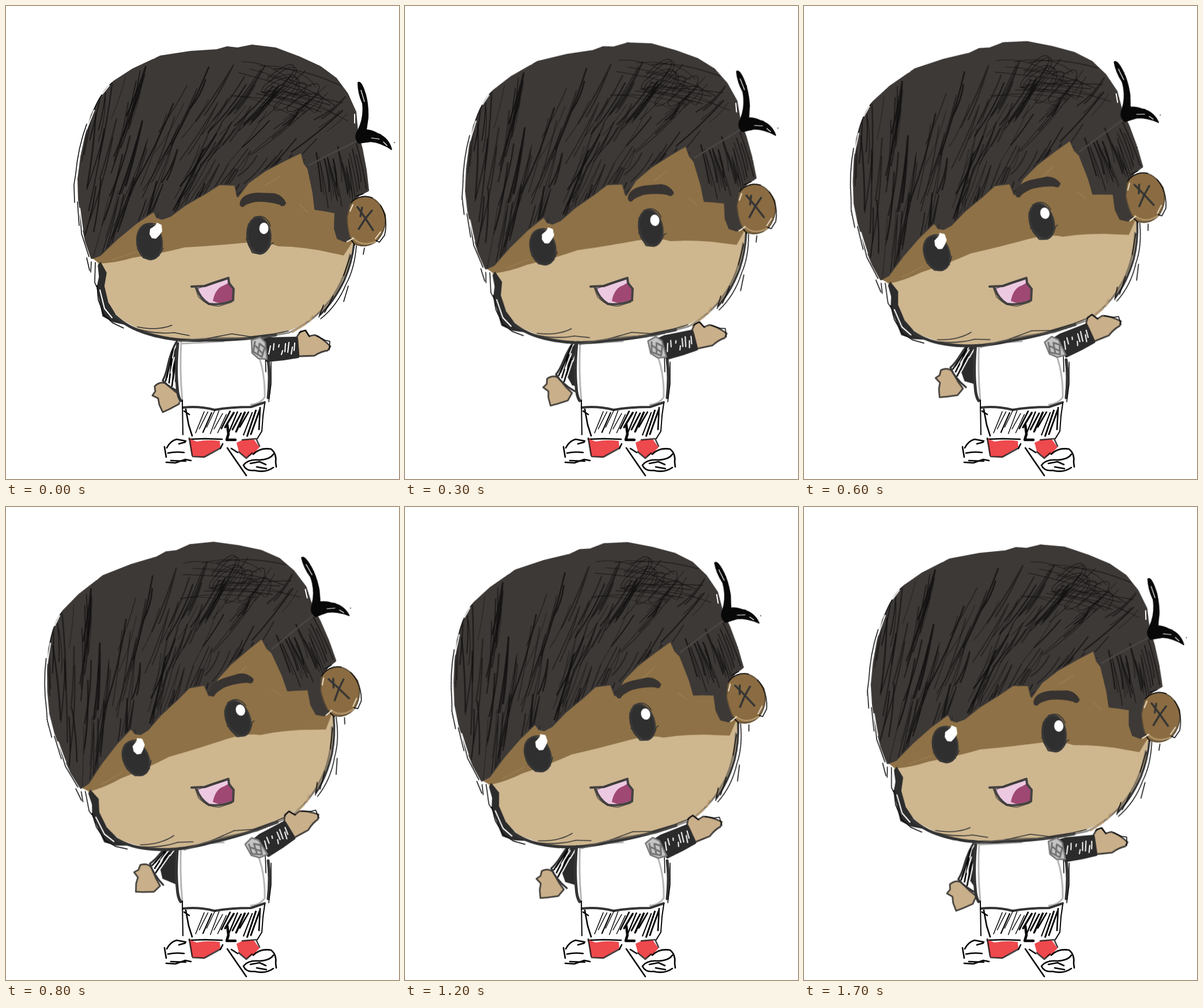
Recreate the animation shown at these times as an HTML page. Size 682 by 821 pixels, loop 1800 ms.

```html
<!DOCTYPE html>
<html lang="en">
<head>
<meta charset="utf-8">
<title>Waving boy</title>
<style>
html, body { margin: 0; width: 100%; height: 100%; overflow: hidden; background: #fff; }
svg { display: block; width: 682px; height: 821px; }
path, ellipse { stroke-linecap: round; stroke-linejoin: round; }
.ink { fill: none; stroke: #343434; stroke-width: 3.4; }
.black { fill: none; stroke: #050505; stroke-width: 2.6; }
.thin { stroke-width: 1.5; }
.thick { stroke-width: 5; }
.soft { fill: none; stroke: #77777788; stroke-width: 3; }
.skin { fill: #c9af8a; stroke: #45413c; stroke-width: 2.8; }
.sleeve { fill: #2b2b2b; stroke: #2b2b2b; stroke-width: 4; }
.gap { fill: none; stroke: #fff; stroke-width: 2; }
.pupil { fill: #2f2f30; stroke: #3a3938; stroke-width: 3; }
.red { fill: #ee494d; }
#head { transform-origin: 362px 547px; }
#eyes { transform-origin: 323px 496px; }
#armL { transform-origin: 327px 588px; }
#armR { transform-origin: 432px 606px; }
</style>
</head>
<body>
<svg viewBox="0 0 682 821">
  <defs>
    <path id="hairShape" d="M149 437L139 408L132 375L127 335L126 300L131 262L139 225L149 190L164 160L187 132L221 110L268 88L320 80L366 77L384 72L402 74L427 69L468 74L508 89L545 106L572 126L592 153L606 184L609 218L617 248L624 285L628 320L612 328L598 342L592 372L596 404L588 408L576 403L571 386L572 358L551 354L537 352L534 325L525 282L518 272L513 253L482 268L448 286L420 306L402 330L398 310L370 309L345 325L312 344L285 364L270 369L262 366L257 355L226 376L192 404L163 432Z"/>
    <clipPath id="hairClip"><use href="#hairShape"/></clipPath>
  </defs>

  <g id="armL">
    <path class="skin" d="M277 655Q267 651 258 660L259 669L254 676L264 681L266 692L272 705L283 700L300 691L305 677L292 668Z"/>
    <path d="M330 580L297 580L288 594L279 628L272 650L284 662L308 673L332 664Z" fill="#fff"/>
    <path d="M299 583L292 598L288 625L290 648L303 664L332 662L332 583Z" fill="#2b2b2b"/>
    <path class="ink" d="M297 581Q286 598 280 627Q277 641 272 650Q284 664 309 673"/>
    <path class="black" d="M290 596L279 645M288 612L283 654M293 619L288 660M282 631L277 651"/>
    <path class="gap" d="M292 610L286 637M296 622L292 650M300 605L297 622"/>
  </g>

  <g id="body">
    <path d="M298 578L452 578L454 690L400 700L306 696L298 682Z" fill="#fff"/>
    <path class="soft" d="M304 583Q301 630 306 686M304 586L345 584L378 582M426 582Q450 620 449 679Q442 690 425 692"/>
    <path class="ink thick" d="M298 586Q294 630 297 660Q298 678 303 685"/>
    <path class="ink thick" d="M455 614Q459 644 455 680"/>
    <path class="black thin" d="M460 618L460 656L456 687M450 604L451 635"/>
    <path class="ink" d="M307 697Q335 694 362 701Q390 696 425 696L449 688" style="stroke-width:4"/>
    <path class="black" d="M306 684L307 744M449 690L446 711L444 738L436 751" style="stroke-width:2"/>
    <path class="black" d="M312 700L317 727L323 746M441 697L439 735M309 703L318 709M318 752L345 751L375 752"/>
    <path class="black" d="M384 727L386 743L383 753L398 753" style="stroke-width:4.5"/>
    <g id="hatch" class="black"></g>
    <path class="red" d="M318 751L331 756Q350 752 371 755L372 766L356 775L343 783L323 781Z"/>
    <path class="red" d="M400 758L411 753L430 752L440 766L429 777L417 784L404 773Z"/>
    <path class="black" d="M324 782L344 783L371 768M318 750L323 780M410 753L434 751L440 764M404 774L417 785L427 776" stroke-opacity=".75"/>
    <path class="black" d="M279 767Q285 755 296 752L312 755M275 765L278 783M281 776Q294 773 309 775M278 792L294 793L311 787L321 789M286 789L312 790M300 760L311 757"/>
    <path class="black" d="M384 767L397 786L417 815M376 760L372 768M391 768L402 775"/>
    <path class="black" d="M429 778Q441 766 460 769Q470 777 468 792L469 800M412 797Q420 786 440 788Q458 787 464 778M412 797Q417 808 431 806Q450 811 464 801M424 794L440 791L451 796M435 800L452 803"/>
  </g>

  <g id="head">
    <path d="M160 380L157 443L167 460L171 490L180 522L198 543L225 558Q262 575 305 580Q370 581 430 575L480 568L518 553L550 529L576 497L594 455L604 410L596 330L520 220L300 300Z" fill="#ceb68f"/>
    <path d="M150 438L162 447Q190 446 220 437Q268 430 310 419Q362 416 414 411Q452 408 472 417Q520 418 562 428L586 433L603 407L590 300L520 200L300 290Z" fill="#8e7146"/>
    <path class="soft" d="M185 440L225 427M510 345L523 358M451 311L476 295" style="stroke:#9a7d50;stroke-width:1.5"/>

    <path d="M164 445L174 463L170 486L177 515L190 536L208 553L186 548L168 538L163 513L158 489L162 470L160 450Z" fill="#2c2c2c" stroke="#2c2c2c" stroke-width="1.5"/>
    <path class="gap" d="M163 493L171 525L184 541"/>
    <path class="black thin" d="M155 445L154 480L157 487M140 437L145 459M148 444L147 462M158 485L160 510L170 536L185 550L204 559"/>
    <path class="ink" d="M187 536Q211 559 247 569Q292 583 345 580Q405 581 468 571" style="stroke-width:5"/>
    <path class="ink thin" d="M203 551Q246 571 292 567L318 572M228 557Q264 564 288 554M350 577L392 569L424 574L465 569L490 564"/>
    <path class="soft" d="M300 582Q365 573 430 578L491 567Q533 548 556 518Q585 485 597 431" style="stroke:#55524daa"/>
    <path class="ink" d="M604 414Q600 446 587 476Q569 513 545 536"/>
    <path class="black thin" d="M608 416Q605 456 590 483Q575 520 546 543M598 433L586 468M594 486L586 513M622 420L620 431M551 519L543 540M568 503L553 532"/>
    <path class="soft" d="M497 566L520 552M526 548L532 538" style="stroke:#b79b72"/>

    <use href="#hairShape" fill="#3d3937" stroke="#3d3937" stroke-width="4" stroke-linejoin="round"/>
    <g clip-path="url(#hairClip)">
      <g id="strands" fill="none" stroke="#0f0e0e"></g>
      <path class="soft" d="M526 276L565 256L612 233" style="stroke:#4a4644"/>
    </g>
    <path class="black thin" d="M140 205Q125 246 121 291L118 310L119 341M184 133Q165 150 152 181M129 364L131 395L144 435M124 340L127 381"/>
    <path class="gap" d="M153 181L140 214M128 351L133 389M179 138L167 153M249 92L258 90M605 188L605 203"/>

    <path d="M611 133Q615 130 621 145Q629 166 628 194L625 215Q636 216 646 222Q664 230 669 249Q652 237 633 235L612 238Q603 228 611 216Q622 194 619 169Q611 151 611 133Z" fill="#080808" stroke="#080808" stroke-width="2"/>
    <path d="M616 146L622 166M634 229L648 231M655 236L661 242" class="gap" style="stroke-width:1.2"/>
    <path class="black thin" d="M627 218L650 223M674 237L674.5 237"/>

    <g transform="translate(1 4)">
      <path d="M596 343Q601 327 626 327Q646 330 657 358Q660 386 641 405Q622 418 603 408Q592 398 591 362Z" fill="#8b6c42" stroke="#5b4c36" stroke-width="2"/>
      <path d="M601 398Q615 415 640 405" fill="none" stroke="#b4996d" stroke-width="2.5"/>
      <path class="black thin" d="M598 337Q615 321 635 329M649 342Q663 365 656 394L647 406L641 403M597 400L604 411M607 326L619 322"/>
      <path class="ink" d="M609 345L621 362L636 385M634 351L622 366L611 383M617 346L614 361"/>
      <path d="M601 341L596 352M649 388L640 400M602 399L591 405" fill="none" stroke="#e8dcc7" stroke-width="2"/>
    </g>
  </g>

  <g id="eyes">
    <path d="M408 338Q414 326 437 325L466 326Q480 330 485 342Q481 350 475 344Q453 338 433 339Q417 342 411 348Q404 347 408 338Z" fill="#373331" stroke="#373331" stroke-width="2"/>
    <ellipse class="pupil" cx="249" cy="409" rx="21.5" ry="31" transform="rotate(-7 249 409)"/>
    <path class="ink thin" d="M232 387Q219 415 238 437Q262 446 273 420M228 421Q242 447 266 433M240 381Q250 374 260 379"/>
    <path d="M250 387L259 381L262 376L270 380L271 391L266 398L260 404L253 403L249 396Z" fill="#fff"/>
    <ellipse class="pupil" cx="439" cy="398" rx="20" ry="31.5" transform="rotate(-5 439 398)"/>
    <path class="ink thin" d="M421 378Q412 410 428 426Q447 440 460 413L464 411M430 367Q451 359 459 382M417 404L427 428L441 431"/>
    <ellipse cx="447.500" cy="386" rx="8" ry="10" fill="#fff"/>
  </g>

  <g id="armR">
    <path class="skin" d="M506 581L505 574L511 565L520 563L526 573L536 571Q550 577 563 591L558 598Q548 599 535 607L508 608Z"/>
    <path class="black thin" d="M509 567L519 563L527 574M539 572L553 580L562 582L561 597"/>
    <path class="sleeve" d="M443 580L456 577L504 576L507 609L482 613L453 616Z"/>
    <path class="gap" d="M459 590L456 604M465 586L464 597M474 588L473 592M480 598L478 605M485 586L484 600M491 584L489 601M497 592L495 604M501 585L500 598"/>
    <path d="M426 580L441 575L450 584L453 613L438 612L427 602Z" fill="#c4c4c4" stroke="#777" stroke-width="2.5"/>
    <path class="soft" d="M432 583L429 600L444 609L449 593L440 586L437 604M433 590L446 604" style="stroke:#555b"/>
  </g>

  <g id="mouth">
    <path d="M331 488L354 484L385 473L388 481L394 491L394 511L371 517L351 516L340 506Z" fill="#ecc9e1"/>
    <path d="M359 512Q363 490 378 485L389 479L394 493L393 510L370 516Z" fill="#a04874"/>
    <path class="ink" d="M322 487L345 486L362 480L386 472L387 481L395 491L394 511Q371 520 352 517Q337 508 331 490" style="stroke:#454341;stroke-width:4"/>
    <path class="ink thin" d="M328 488L334 505Q350 521 370 521L392 514M334 490L356 481L379 475" stroke-opacity=".7"/>
  </g>
</svg>
<script>
const $ = id => document.getElementById(id);

let seed = 41;
function rnd(lo = 0, hi = 1) {
  seed = (seed * 1664525 + 1013904223) % 4294967296;
  return lo + (hi - lo) * seed / 4294967296;
}

function line(parent, d, width, opacity = 1) {
  const p = document.createElementNS('http://www.w3.org/2000/svg', 'path');
  p.setAttribute('d', d);
  p.setAttribute('style', `stroke-width:${width};stroke-opacity:${opacity}`);
  parent.append(p);
}

// A long pen pull, sometimes swinging back beside itself.
function strand(x, y, angle, len) {
  const a = angle * Math.PI / 180;
  const dx = Math.cos(a) * len / 2, dy = -Math.sin(a) * len / 2;
  const bend = rnd(1, 5);
  let d = `M${x - dx} ${y - dy}Q${x + bend} ${y + bend} ${x + dx} ${y + dy}`;
  if (rnd() < .3) d += `q${-dx + 5} ${-dy + 7} ${-dx * 1.7 + 5} ${-dy * 1.7 + 4}`;
  line($('strands'), d, rnd(1, 2.8), rnd(.4, .85));
}

for (let i = 0; i < 150; i++) {
  const x = rnd(138, 585), y = rnd(145, 400);
  const lean = Math.min(1, (x - 135) / 390);
  if (x < 505 || y < 225) strand(x, y, 80 - 42 * lean + rnd(-5, 5), rnd(80, 180) - 50 * lean);
}
for (let i = 0; i < 17; i++) strand(543 + i * 4.6, rnd(277, 315), rnd(94, 103), rnd(45, 85));
for (let i = 0; i < 14; i++) {
  const x = rnd(380, 470), y = rnd(90, 160);
  line($('strands'), `M${x} ${y}q${rnd(40, 80)} ${rnd(-5, 20)} ${rnd(90, 135)} ${rnd(20, 65)}`, rnd(1, 2.2), .55);
}
for (let i = 0; i < 4; i++) {
  line($('strands'), `M${rnd(450, 500)} ${rnd(115, 165)}c45 -45 65 -25 30 5s-55 15 -20 -5s60 -5 30 25`, 1.4, .6);
}

for (let i = 0; i < 16; i++) {
  const x = 329 + i * 6.4, top = rnd(700, 709);
  line($('hatch'), `M${x + 15} ${top}L${x} ${rnd(728, 750)}`, i > 6 ? rnd(1.8, 3.8) : rnd(1.2, 2.4));
}

// Tilt rises over nine steps and falls back a little slower.
const steps = 18;
const tilt = k => k <= 9 ? k / 9 : 1 - (k - 9) * .1083;
const swing = { head: -14.4, eyes: -20.5, armL: 30, armR: -30 };

for (const [id, deg] of Object.entries(swing)) {
  const frames = [];
  for (let k = 0; k <= steps; k++) {
    frames.push({
      offset: k / steps,
      transform: `rotate(${deg * tilt(k % steps)}deg)`,
      easing: 'steps(1, end)'
    });
  }
  $(id).animate(frames, { duration: 1800, iterations: Infinity });
}
</script>
</body>
</html>
```
